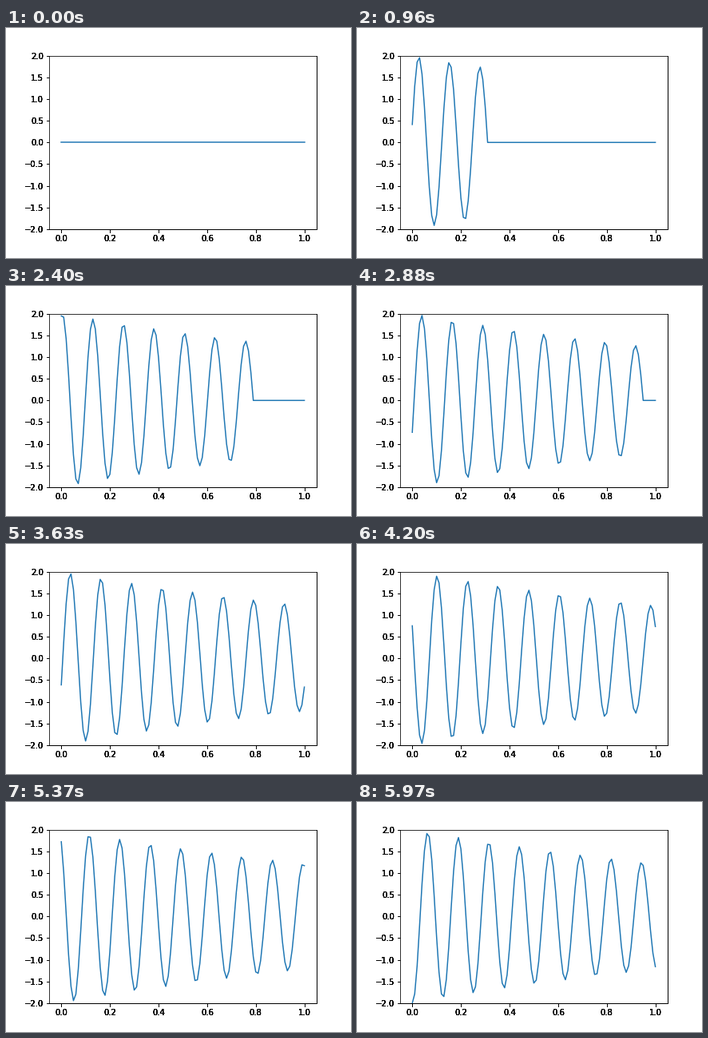
Recreate the animation shown at these times as a matplotlib script. Size 432 px wide and 288 px high, loop 6 s.

```python
import numpy as np
import matplotlib.pyplot as plt
from matplotlib.animation import FuncAnimation

FRAMES = 200
INTERVAL = 30   # ms
DX = 0.01
K = 50          # wave number
DECAY = 0.5
LAYERS = 5      # overlaid axes give the heavy look of ticks and labels

plt.rcParams.update({"font.family": "DejaVu Sans", "font.size": 10})

fig = plt.figure(figsize=(6, 4), dpi=72, facecolor="white")
x = np.linspace(0, 1, 101)


def add_axes():
    ax = fig.add_axes([0.125, 0.125, 0.775, 0.755])
    ax.set_xlim(-0.05, 1.05)
    ax.set_ylim(-2, 2)
    ax.set_xticks(np.linspace(0, 1, 6))
    ax.set_yticks(np.linspace(-2, 2, 9))
    return ax


ax = [add_axes() for _ in range(LAYERS)][-1]
line, = ax.plot(x, np.zeros_like(x), color="#1f77b4", lw=1.5)


def wave(t):
    """Damped sine entering from the left, flat ahead of its front."""
    lag = np.maximum(t - x, 0)
    return 2 * np.exp(-DECAY * x) * np.sin(K * lag)


def update(i):
    line.set_ydata(wave((i - 1) * DX))
    return line,


anim = FuncAnimation(fig, update, frames=FRAMES, interval=INTERVAL,
                     repeat=True, repeat_delay=0, blit=False)
plt.show()
```
